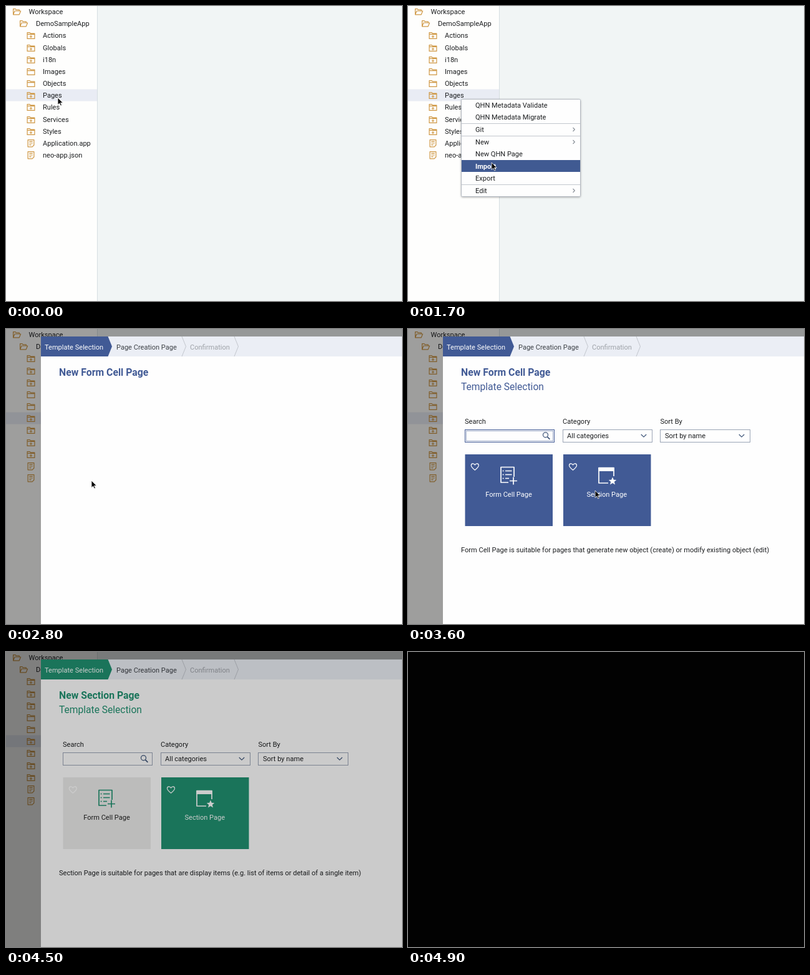
Write an HTML page that moves like this. It is 635 px wide and 473 px high and loops after 5000 ms.

```html
<!DOCTYPE html>
<html lang="en">
<head>
<meta charset="utf-8">
<title>New page wizard</title>
<style>
html, body { margin: 0; width: 100%; height: 100%; overflow: hidden; background: #fefefd; }
svg { display: block; width: 635px; height: 473px; }
text { font: 11.06px Roboto, "Noto Sans", sans-serif; fill: #1c1e20; white-space: pre; }
.line { fill: none; stroke-width: 1.2; stroke-linejoin: round; }
.icon { stroke: #cf9845; }
.thin { stroke: #c3c7ce; stroke-width: 1; }
.mid { text-anchor: middle; }
.title { font-size: 15.8px; font-weight: 700; fill: currentColor; }
.sub { font-size: 15.6px; fill: currentColor; }
.white { fill: #fff; }
.field { fill: #fefefe; stroke: #9aa4b5; }
.glyph { stroke: #3d5478; }
.heart { stroke: #fff; }

.menu, .hover, .shade, .dialog, .content, .first, .second, .card, .cursor, .fade {
  animation: 5s step-end infinite;
}
.menu { animation-name: menu; }
.hover { animation-name: hover; }
.hover text { fill: #fff; font-weight: 700; }
.shade { animation-name: shade; }
.dialog { animation-name: dialog; color: #415a95; }
.content { animation-name: content; }
.first { animation-name: first; }
.second { animation-name: second; }
.unpick { animation-name: unpick; }
.pick { animation-name: pick; }
.card rect.back { fill: var(--bg); }
.card .ink { stroke: var(--ink); }
.card .solid { fill: var(--ink); }
.card text { fill: var(--label); }
.cursor { animation-name: cursor; }
.fade { animation-name: fade; }

@keyframes menu { 0% { visibility: hidden } 18% { visibility: visible } 52%, 100% { visibility: hidden } }
@keyframes hover {
  0% { clip-path: inset(156px 0 0 0) }
  24% { clip-path: inset(1px 0 136px 0) }
  30% { clip-path: inset(40px 0 97px 0) }
  32% { clip-path: inset(60px 0 77px 0) }
  34%, 100% { clip-path: inset(98px 0 39px 0) }
}
@keyframes shade { 0% { visibility: hidden } 52%, 100% { visibility: visible } }
@keyframes dialog {
  0% { visibility: hidden; color: #415a95 }
  54% { visibility: visible; color: #415a95 }
  90% { visibility: visible; color: #209170 }
  94%, 100% { visibility: visible; color: #555a58 }
}
@keyframes content { 0% { opacity: 0 } 60%, 100% { opacity: 1 } }
@keyframes first { 0% { opacity: 1 } 78%, 100% { opacity: 0 } }
@keyframes second { 0% { opacity: 0 } 78%, 100% { opacity: 1 } }
@keyframes unpick {
  0% { --bg: currentColor; --ink: #fff; --label: #fff }
  78%, 100% { --bg: #ebebea; --ink: currentColor; --label: #222 }
}
@keyframes pick {
  0% { --bg: #ebebea; --ink: currentColor; --label: #222 }
  70%, 100% { --bg: currentColor; --ink: #fff; --label: #fff }
}
@keyframes cursor {
  0% { transform: translate(83px, 147px) }
  20% { transform: translate(83px, 147px); animation-timing-function: steps(4) }
  28% { transform: translate(118px, 160px); animation-timing-function: steps(3) }
  34% { transform: translate(134px, 251px) }
  52% { transform: translate(134px, 251px); animation-timing-function: steps(2) }
  56% { transform: translate(137px, 243px) }
  64% { transform: translate(137px, 243px); animation-timing-function: steps(4) }
  72% { transform: translate(300px, 259px) }
  80% { transform: translate(300px, 259px); animation-timing-function: steps(3) }
  86% { transform: translate(410px, 392px); visibility: visible }
  88%, 100% { transform: translate(410px, 392px); visibility: hidden }
}
@keyframes fade {
  0% { opacity: 0 }
  90% { opacity: 0; animation-timing-function: steps(5, start) }
  100% { opacity: 1 }
}
</style>
</head>
<body>
<svg viewBox="0 0 635 473">
  <defs>
    <path id="folder" d="M.6 10.4V.6H4.6L6 2.2H12.4V10.4ZM.6 3.6H12.4"/>
    <path id="plus" d="M.6 10.4V.6H4.6L6 2.2H12.4V10.4ZM.6 3.4H12.4M6.5 4.8V9.2M4.3 7H8.7"/>
    <path id="open" d="M.6 9.6V.6H4L5.4 2.2H10.4V4M.6 9.8L3 4H12.6L10.2 9.8Z"/>
    <path id="file" d="M1.6 .6H11.4V9L8.6 11.8H1.6ZM3.8 3.4H9.2M3.8 6H9.2M3.8 8.6H7"/>
    <path id="heart" d="M0 5.4C-3 3-6 .8-6-2C-6-5.6-1.6-6 0-2.8C1.6-6 6-5.6 6-2C6 .8 3 3 0 5.4Z"/>
    <path id="down" d="M-4.2-2L0 2.2L4.2-2"/>
    <filter id="soft" x="-10%" y="-10%" width="120%" height="120%">
      <feDropShadow dx="0" dy="1" stdDeviation="1.5" flood-opacity=".3"/>
    </filter>
  </defs>

  <rect width="635" height="473" fill="#fefefd"/>
  <rect x="146" width="489" height="473" fill="#f1f5f5"/>
  <path d="M146.5 0V473" stroke="#d6dee2"/>
  <rect y="133.5" width="146" height="19" fill="#e9ecf4"/>
  <g id="tree"></g>

  <g class="menu">
    <rect x="85.5" y="149.5" width="191" height="156" rx="2" fill="#fefefe" stroke="#b4bac2" filter="url(#soft)"/>
    <path class="line thin" d="M86 188.5H276M86 208.5H276M86 286.5H276"/>
    <g id="items"></g>
    <g class="hover" id="hot"><rect x="86" y="149" width="190" height="156" fill="#405a92"/></g>
  </g>

  <rect class="shade" width="635" height="473" opacity=".38"/>

  <g class="dialog">
    <rect x="56" y="12" width="579" height="461" fill="#fefefe"/>
    <rect x="56" y="12" width="579" height="32" fill="#ebeef5"/>
    <path d="M56 12H163.5L170 28L163.5 44H56Z" fill="currentColor"/>
    <path class="line thin" d="M282 12L288.5 28L282 44M366 12L372.5 28L366 44"/>
    <text class="white" x="62" y="33">Template Selection</text>
    <text x="177" y="33" style="fill:#3c4046">Page Creation Page</text>
    <text x="295" y="33" style="fill:#9ea2a8">Confirmation</text>
    <text class="title first" x="85" y="74.5">New Form Cell Page</text>
    <text class="title second" x="85" y="74.5">New Section Page</text>

    <g class="content">
      <text class="sub" x="85" y="97.5">Template Selection</text>
      <text x="91" y="152">Search</text>
      <text x="248" y="152">Category</text>
      <text x="404.5" y="152">Sort By</text>
      <rect class="field" x="91.5" y="161.5" width="143" height="20"/>
      <rect class="field" x="248.5" y="161.5" width="143" height="20"/>
      <rect class="field" x="404.5" y="161.5" width="144" height="20"/>
      <g class="first" fill="none" stroke="#415a95">
        <rect x="91.5" y="161.5" width="143" height="20"/>
        <rect x="93.5" y="163.5" width="139" height="16" stroke-dasharray="1 1"/>
      </g>
      <g class="line glyph">
        <circle cx="220.5" cy="169.8" r="4"/>
        <path d="M223.4 172.8L227.4 176.8" stroke-width="1.7"/>
        <use href="#down" x="378" y="171"/>
        <use href="#down" x="535" y="171"/>
      </g>
      <text x="255" y="175">All categories</text>
      <text x="412" y="175">Sort by name</text>

      <g class="card unpick">
        <rect class="back" x="91.5" y="201" width="140.5" height="115"/>
        <use class="line heart" href="#heart" x="107.3" y="220.8"/>
        <g class="line ink" style="stroke-width:1.7">
          <path d="M161 246H149V221.5H170V237M156 227.5H166.5M156 233.5H166.5M156 239.5H162"/>
          <path d="M151.6 227.5H153.6M151.6 233.5H153.6M151.6 239.5H153.6M169 237.5V249.5M163 243.5H175"/>
        </g>
        <text class="mid" x="161.5" y="268.5">Form Cell Page</text>
      </g>
      <g class="card pick">
        <rect class="back" x="249" y="201" width="140.5" height="115"/>
        <use class="line heart" href="#heart" x="264.5" y="220.8"/>
        <path class="line ink" style="stroke-width:1.7" d="M321 247H306V222.5H330V236"/>
        <rect class="solid" x="305.5" y="222" width="25" height="6"/>
        <path class="solid" d="M328 237.5L329.8 241.8L334.2 242L330.8 245L332 249.5L328 247L324 249.5L325.2 245L321.8 242L326.2 241.8Z"/>
        <text class="mid" x="318.8" y="268.5">Section Page</text>
      </g>

      <text class="first" x="85" y="358">Form Cell Page is suitable for pages that generate new object (create) or modify existing object (edit)</text>
      <text class="second" x="85" y="358">Section Page is suitable for pages that are display items (e.g. list of items or detail of a single item)</text>
    </g>
  </g>

  <path class="cursor" d="M0 0V11.5L2.7 9L4.6 13L6.4 12.2L4.6 8.3H8.2Z" fill="#080808" stroke="#fff" stroke-width=".8"/>
  <rect class="fade" width="635" height="473" fill="#020202"/>
</svg>
<script>
const byId = id => document.getElementById(id);
const label = (x, y, s) => `<text x="${x}" y="${y}">${s}</text>`;
const icon = (name, x, y) => `<use class="line icon" href="#${name}" x="${x}" y="${y}"/>`;

const tree = [
  ["open", "Workspace"], ["open", "DemoSampleApp"],
  ["plus", "Actions"], ["plus", "Globals"], ["plus", "i18n"],
  ["folder", "Images"], ["folder", "Objects"], ["plus", "Pages"],
  ["plus", "Rules"], ["plus", "Services"], ["plus", "Styles"],
  ["file", "Application.app"], ["file", "neo-app.json"]
];
byId("tree").innerHTML = tree.map(([kind, name], i) => {
  const y = 9 + i * 19.17, depth = Math.min(i, 2);
  const top = Math.round(y) - (kind === "file" ? 6 : 5);
  return icon(kind, [11, 22, 33.5][depth], top) + label([36.5, 48, 59][depth], y + 4, name);
}).join("");

const items = [
  [159, "QHN Metadata Validate"], [178, "QHN Metadata Migrate"], [198, "Git", true],
  [218, "New", true], [237, "New QHN Page"], [257, "Import"], [276, "Export"], [296, "Edit", true]
];
const rows = items.map(([y, name, more]) => label(108, y + 4, name) +
  (more ? `<path class="line" stroke="#8c929a" d="M264.5 ${y - 3}L267.3 ${y}L264.5 ${y + 3}"/>` : "")).join("");
byId("items").innerHTML = rows;
byId("hot").insertAdjacentHTML("beforeend", rows);
</script>
</body>
</html>
```
